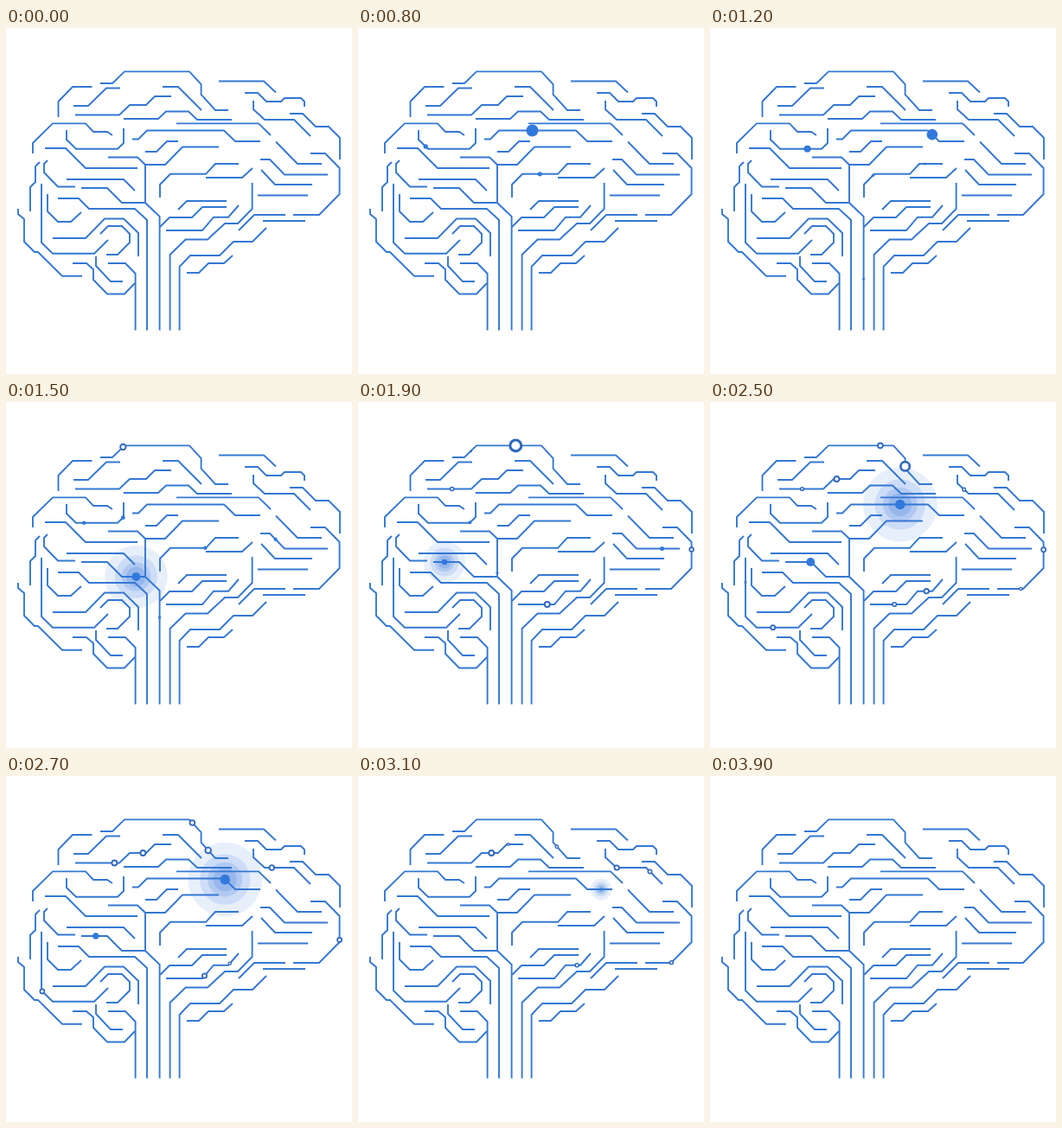
These frames come from a looping animation (400x400 px, 4 s). An HTML page:

```html
<!DOCTYPE html>
<html lang="en">
<head>
<meta charset="utf-8">
<title>Circuit brain</title>
<style>
  html, body { margin: 0; width: 100%; height: 100%; overflow: hidden; background: #fff; }
  svg { display: block; width: 100vw; height: 100vh; }
  #wires { fill: none; stroke: #3478d2; stroke-width: 1.9; }
  .halo { fill: #3072d8; }
  .dot { fill: #3279dd; }
  .ring { fill: #fff; stroke: #3068bd; }
</style>
</head>
<body>
<svg viewBox="0 0 400 400">
  <g id="halos"></g>
  <g id="wires">
    <!-- top -->
    <path d="M60.500 103V85L77 68H99.500"/>
    <path id="crown" d="M109 64H123L137 50.400H212L225.600 65V77L242 95H257"/>
    <path d="M78 90H95L116 69.500H132"/>
    <path id="brow" d="M80 100.500H131L143 89H162L172 79H191"/>
    <path d="M181 68H199L226 95"/>
    <path d="M246 61.500H298L312 74.500"/>
    <path d="M276 75H291L301 85H318L322 81H341L345 85V91"/>
    <path id="back" d="M286 84V94L299 106H333L352 125"/>
    <path d="M328 99H343L358 114H373L386 127V152"/>
    <!-- middle -->
    <path d="M31 145V133L54 110.400H92L101 120H117L123 124"/>
    <path id="cup" d="M70 118V129L81 139.700H129L136 133V116"/>
    <path d="M136 105H176L185 96.500H211L221 106H261"/>
    <path d="M197 110.400H292L306 124"/>
    <path id="core" d="M146 128.500H153L163 118.500H252L265 131H294"/>
    <path d="M161 143H174L186 131H199"/>
    <path d="M45 139H69L92 162H152"/>
    <path id="stem" d="M118 149.500H152L161 158V202L177.600 218V349.500"/>
    <path d="M161 158H184L204 137.500H246"/>
    <path d="M312 131.500L337 157H365"/>
    <path id="rear" d="M352 145H369L385.600 162V192L362 216H332"/>
    <path id="fork" d="M294 152H305L322 169.500H372"/>
    <path d="M295 164L311 181H354"/>
    <path d="M291 193.500H349"/>
    <path id="mid" d="M178 196V181L190 168.800H231L242 157H269"/>
    <path d="M231 173H273L285 162"/>
    <path d="M199 210L209 200H255"/>
    <path d="M178 230L189 219H215L227 207H255"/>
    <path id="low" d="M185 234H227L240 218.700H257L269 205"/>
    <path d="M269 234L287 216H323"/>
    <path d="M297 223H346"/>
    <!-- trunk -->
    <path d="M189.600 349.500V262L207.600 244.500H233L253 226H268L284.600 209V179"/>
    <path d="M200.600 349.500V276L213 263H247L263 247H285L301 231"/>
    <path d="M209 283H223L234 272H252L262 263"/>
    <!-- left -->
    <path d="M39 155L34 160V178L28 184V212"/>
    <path d="M48 153L44 157V167L60 183.500H80"/>
    <path d="M70 175H136L149 188"/>
    <path id="side" d="M161 202H134L117 185H87"/>
    <path d="M60 197H84L96 209H149L163 222V349.500"/>
    <path d="M48 192V212L60 224H75L87 213"/>
    <path id="edge" d="M118 245L102 260.700H54L41 248V180"/>
    <path d="M14 209V215L21 221V247L33 259H37L65 286.700H88"/>
    <path d="M54 243H92L114 220.500H136L153 237V264"/>
    <path d="M109 238L118 229H134L143 238V248L129 262H116"/>
    <path d="M77 272H93L101 279V291L117 307.500H137L149 295"/>
    <path d="M118 272H138L149.600 284V349.500"/>
    <path d="M104 264V275L121 293H135"/>
  </g>
  <g id="sparks"></g>
</svg>
<script>
const LOOP = 4000, STEP = 100;
const LAYERS = 4, HALO_SCALE = 7.4;
const byId = id => document.getElementById(id);

const glide = p => p * p * (3 - 2 * p);
const coast = p => Math.sin(p * Math.PI / 2);
const dash = p => (1 - 2 ** (-5 * p)) / (1 - 2 ** -5);

// Grow from the start of the wire, hold, shrink towards its end
const swell = (e, rise) => Math.min(1, rise * e, 3.5 * (1 - e));

const sparks = [];

function set(el, attrs) {
  for (const k in attrs) el.setAttribute(k, attrs[k]);
}

function circle(parent, cls) {
  const c = document.createElementNS('http://www.w3.org/2000/svg', 'circle');
  set(c, { class: cls });
  return byId(parent).appendChild(c);
}

function spark(cls, id, start, span, size, ease = glide) {
  const wire = byId(id);
  const s = { cls, wire, start, span, size, ease, length: wire.getTotalLength(), el: circle('sparks', cls), halo: [] };
  sparks.push(s);
  return s;
}

function pulse(id, start, span) {
  const s = spark('dot', id, start, span, 5.8, dash);
  for (let i = 0; i < LAYERS; i++) {
    const el = circle('halos', 'halo');
    set(el, { 'fill-opacity': .115 + .03 * i });
    s.halo.push({ el, scale: HALO_SCALE * .68 ** i });
  }
}

const dot = (...args) => spark('dot', ...args);
const ring = (...args) => spark('ring', ...args);

dot('core', 130, 1600, 7);
dot('mid', 100, 1500, 2.6);
dot('mid', 800, 1200, 2.2);
dot('cup', 300, 1640, 4);
dot('cup', 900, 1500, 2.2);
dot('fork', 1150, 1100, 3);
dot('side', 2110, 1400, 5, dash);
pulse('side', 1465, 900);
pulse('core', 2245, 1350);

ring('crown', 1250, 2250, 8, coast);
ring('crown', 1700, 2300, 3.8, coast);
ring('brow', 1530, 2400, 3.9, coast);
ring('brow', 2230, 1900, 3.9, coast);
ring('back', 2000, 1600, 3.7);
ring('back', 2540, 1500, 3.8);
ring('rear', 1080, 2000, 3.2);
ring('rear', 1620, 2140, 3.4);
ring('low', 1460, 1950, 4, coast);
ring('low', 2200, 1600, 3.5, coast);
ring('edge', 1700, 1100, 2.7);
ring('edge', 2000, 1300, 3.4);

// One faint spark climbs the trunk against the direction of its wire
dot('stem', 400, 2500, 1.7, p => 1 - glide(p));

function draw(t) {
  for (const s of sparks) {
    const p = (t - s.start) / s.span;
    const shown = p > 0 && p < 1;
    const all = [s.el, ...s.halo.map(h => h.el)];
    all.forEach(el => set(el, { visibility: shown ? 'visible' : 'hidden' }));
    if (!shown) continue;

    const e = s.ease(p);
    const r = s.size * swell(e, s.halo.length ? 6.5 : 3);
    const { x, y } = s.wire.getPointAtLength(e * s.length);
    all.forEach(el => set(el, { cx: x, cy: y }));
    const w = s.cls === 'ring' ? Math.min(r, .7 + .3 * r) : 0;
    set(s.el, { r: r - w / 2, 'stroke-width': w });
    s.halo.forEach(h => set(h.el, { r: r * h.scale }));
  }
}

const begin = performance.now();
function tick() {
  const t = (performance.now() - begin) % LOOP;
  draw(Math.floor(t / STEP) * STEP);
  requestAnimationFrame(tick);
}
tick();
</script>
</body>
</html>
```
